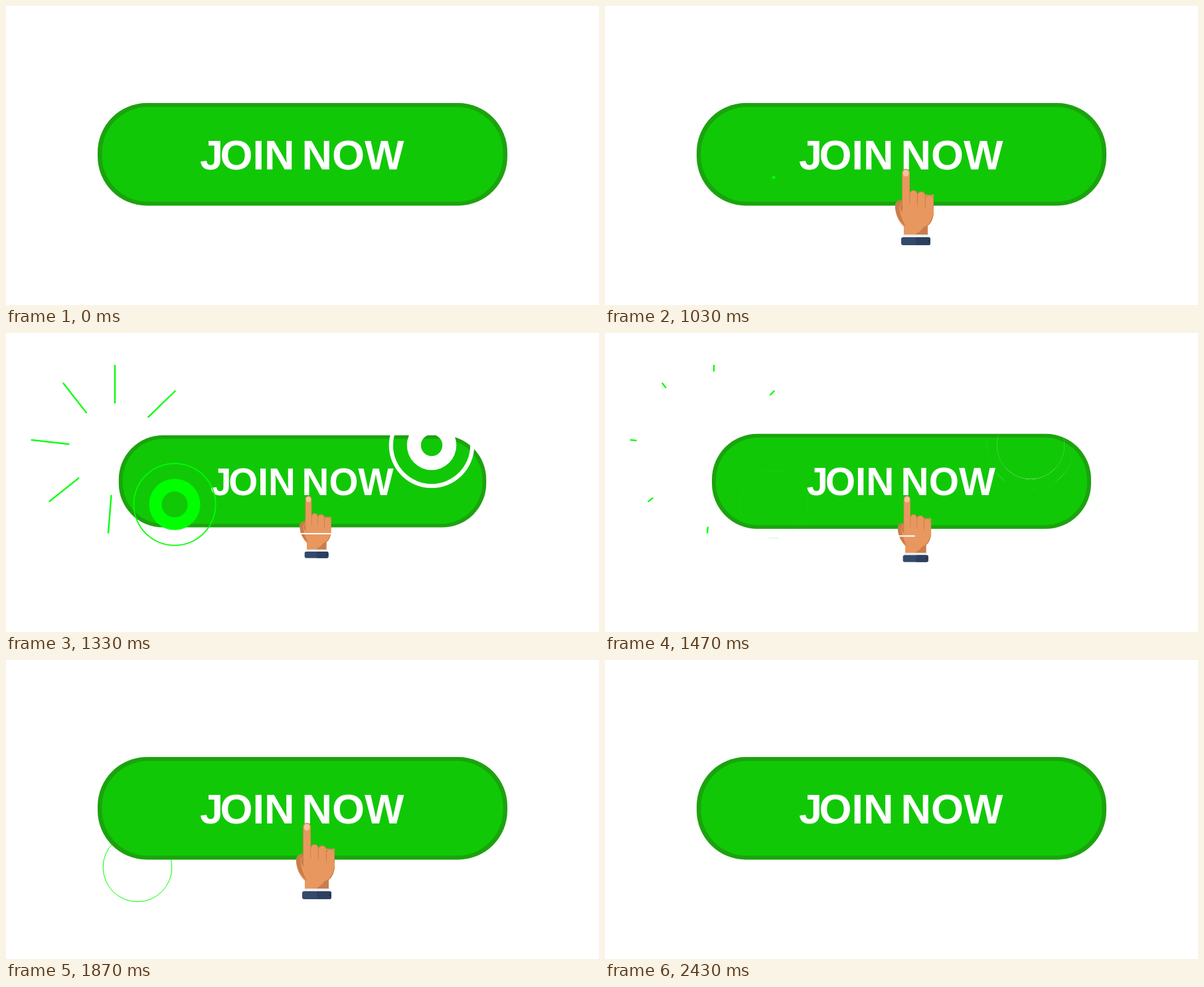
An HTML page with a canvas that plays this animation: 893 by 450 pixels, repeating every 2.46 s.

```html
<!DOCTYPE html>
<html lang="en">
<head>
<meta charset="utf-8">
<title>Join now</title>
<style>
  html, body { margin: 0; width: 100%; height: 100%; overflow: hidden; background: #fff; }
  canvas { display: block; }
</style>
</head>
<body>
<canvas id="stage" width="893" height="450"></canvas>
<script>
const LOOP = 2460, W = 893, H = 450, TAU = Math.PI * 2;
const GREEN = '#11c807', EDGE = '#1ba30e', BRIGHT = '#00ff00';
const SKIN = '#e8985f', SHADE = '#c97d4b';

const stage = document.getElementById('stage');
const ctx = stage.getContext('2d');
const layer = Object.assign(document.createElement('canvas'), { width: W, height: H });
const handCtx = layer.getContext('2d');

const span = (t, from, to) => Math.min(1, Math.max(0, (t - from) / (to - from)));
const mix = (a, b, u) => a + (b - a) * u;
const easeOut = (u, power) => 1 - (1 - u) ** power;
const smooth = u => (1 - Math.cos(Math.PI * u)) / 2;

function scaleAbout(c, x, y, s) {
  c.translate(x, y);
  c.scale(s, s);
  c.translate(-x, -y);
}

function roundBox(c, x, y, w, h, r, color) {
  c.fillStyle = color;
  c.beginPath();
  c.roundRect(x, y, w, h, r);
  c.fill();
}

function strokeCircle(x, y, r, width, color) {
  ctx.strokeStyle = color;
  ctx.lineWidth = width;
  ctx.beginPath();
  ctx.arc(x, y, r, 0, TAU);
  ctx.stroke();
}

// How far the button is pushed in: 0 at rest, 1 fully pressed.
const pressAt = t => smooth(span(t, 1030, 1330)) - smooth(span(t, 1330, 1730));

function drawButton(press) {
  ctx.save();
  scaleAbout(ctx, 446.5, 223.5, 1 - 0.103 * press);
  roundBox(ctx, 138, 146, 617, 154.5, 74, EDGE);
  roundBox(ctx, 144.5, 152, 604, 142.5, 69, GREEN);
  ctx.fillStyle = '#fff';
  ctx.font = 'bold 63px "Liberation Sans", Arial, sans-serif';
  ctx.fillText('J', 292, 246);
  ctx.fillText('OIN', 322.5, 246);
  ctx.fillText('NOW', 445.5, 246);
  ctx.restore();
}

function drawBurst(t) {
  if (t <= 1035 || t >= 1500) return;
  const outer = 127 * easeOut(span(t, 1030, 1330), 3);
  const inner = Math.min(outer, 127 * span(t, 1130, 1500));
  ctx.strokeStyle = BRIGHT;
  ctx.lineWidth = 2.3;
  for (const degrees of [-90, -44, 3, 49, 94.5, 141.5, 186.4, 232]) {
    const a = degrees * Math.PI / 180, dx = Math.cos(a), dy = Math.sin(a);
    ctx.beginPath();
    ctx.moveTo(164 + dx * inner, 175 + dy * inner);
    ctx.lineTo(164 + dx * outer, 175 + dy * outer);
    ctx.stroke();
  }
}

// Two nested rings whose holes grow until they swallow them.
function drawRipple(t, x, y, start, size, holeDelay, color) {
  const u = span(t, start, start + 500);
  if (u <= 0 || u >= 1) return;
  const grow = delay => easeOut(span(u, delay, 1), 4);
  ctx.fillStyle = color;
  ctx.beginPath();
  for (const r of [size * grow(0), size * grow(holeDelay), 51 * grow(0.445), 51 * grow(0.56)]) {
    ctx.moveTo(x + r, y);
    ctx.arc(x, y, r, 0, TAU);
  }
  ctx.fill('evenodd');
}

function drawLateRing(t) {
  const u = span(t, 1640, 2060);
  if (u > 0 && u < 1) strokeCircle(198, 312, 65 * easeOut(u, 2), 1, BRIGHT);
}

function drawHairlines(t) {
  if (t < 1500 || t > 1600) return;
  strokeCircle(641, 169, 65, 1, 'rgba(255,255,255,.4)');
  strokeCircle(311, 124, 30, 1, 'rgba(255,255,255,.4)');
}

function fillPath(c, d, color) {
  c.fillStyle = color;
  c.fill(new Path2D(d));
}

function paintHand(c, drop, scale) {
  c.clearRect(0, 0, W, H);
  c.save();
  c.translate(0, drop);
  scaleAbout(c, 466, 245, scale);

  // Wrist and palm
  fillPath(c, 'M450 322H486V346H450Z', SKIN);
  fillPath(c, 'M488 316Q482 336 467 345H486V331Z', SHADE);
  fillPath(c, 'M437 303Q436 293 447 292L459 284H495V312Q494 322 488 329Q480 334 470 334H452Q438 322 437 303Z', SKIN);
  fillPath(c, 'M495 308Q493 324 484 331Q476 338 467 344H486V331Q495 324 495 308Z', SHADE);
  fillPath(c, 'M437 303Q436 293 447 292V296Q442 299 444 308Q446 320 453 332Q438 320 437 303Z', SHADE);
  fillPath(c, 'M448 297Q443 299 445 306L448 311Z', SHADE);

  // Folded fingers, then the pointing one
  for (const [x, y, w] of [[482, 284, 13], [470, 279, 12.5], [458.5, 277, 12]]) {
    roundBox(c, x, y, w, 25, 6, SHADE);
    roundBox(c, x + 0.8, y + 1, w - 1.5, 26, 6, SKIN);
  }
  roundBox(c, 447, 245, 12, 57, 6, SHADE);
  roundBox(c, 448, 245.5, 10.5, 59, 5.2, SKIN);
  roundBox(c, 448.8, 246.5, 8.6, 10, 4.3, '#f5c4a0');

  // Cuff and sleeve
  c.fillStyle = '#eceef0';
  c.fillRect(449, 344, 38, 4.5);
  roundBox(c, 446, 348, 44, 12, 3, '#344a6b');
  roundBox(c, 468, 348, 22, 12, 3, '#2d405f');
  roundBox(c, 486, 352.5, 2.5, 2.5, 1.2, '#1c2b44');
  c.restore();
}

// The hand blends with the button but is either solid or absent beyond it.
function drawHand(t, press) {
  const alpha = t < 1400 ? easeOut(span(t, 270, 670), 2) : 1 - span(t, 2100, 2430) ** 2;
  if (alpha <= 0) return;
  paintHand(handCtx, 64 * (1 - alpha), 1 - 0.184 * press);
  if (alpha === 1) {
    ctx.drawImage(layer, 0, 0);
    return;
  }
  const pill = new Path2D();
  pill.roundRect(138, 146, 617, 154.5, 74);
  ctx.save();
  ctx.clip(pill);
  ctx.globalAlpha = alpha;
  ctx.drawImage(layer, 0, 0);
  ctx.restore();
  if (alpha < 0.45) return;
  const beyond = new Path2D(pill);
  beyond.rect(0, 0, W, H);
  ctx.save();
  ctx.clip(beyond, 'evenodd');
  ctx.drawImage(layer, 0, 0);
  ctx.restore();
}

function drawGlint(t) {
  if (t < 1270 || t > 1600) return;
  const u = span(t, 1330, 1570);
  ctx.fillStyle = '#fff';
  ctx.fillRect(436, mix(301, 307, u), mix(56, 13, u), 2);
}

function draw(t) {
  const press = pressAt(t);
  ctx.fillStyle = '#fff';
  ctx.fillRect(0, 0, W, H);
  drawBurst(t);
  drawLateRing(t);
  drawButton(press);
  drawRipple(t, 254, 258, 1026, 64, 0.174, BRIGHT);
  drawRipple(t, 641, 169, 1031, 66, 0.32, '#fff');
  drawHairlines(t);
  drawHand(t, press);
  drawGlint(t);
}

const begin = performance.now();
function frame() {
  draw((performance.now() - begin) % LOOP);
  requestAnimationFrame(frame);
}
frame();
</script>
</body>
</html>
```
